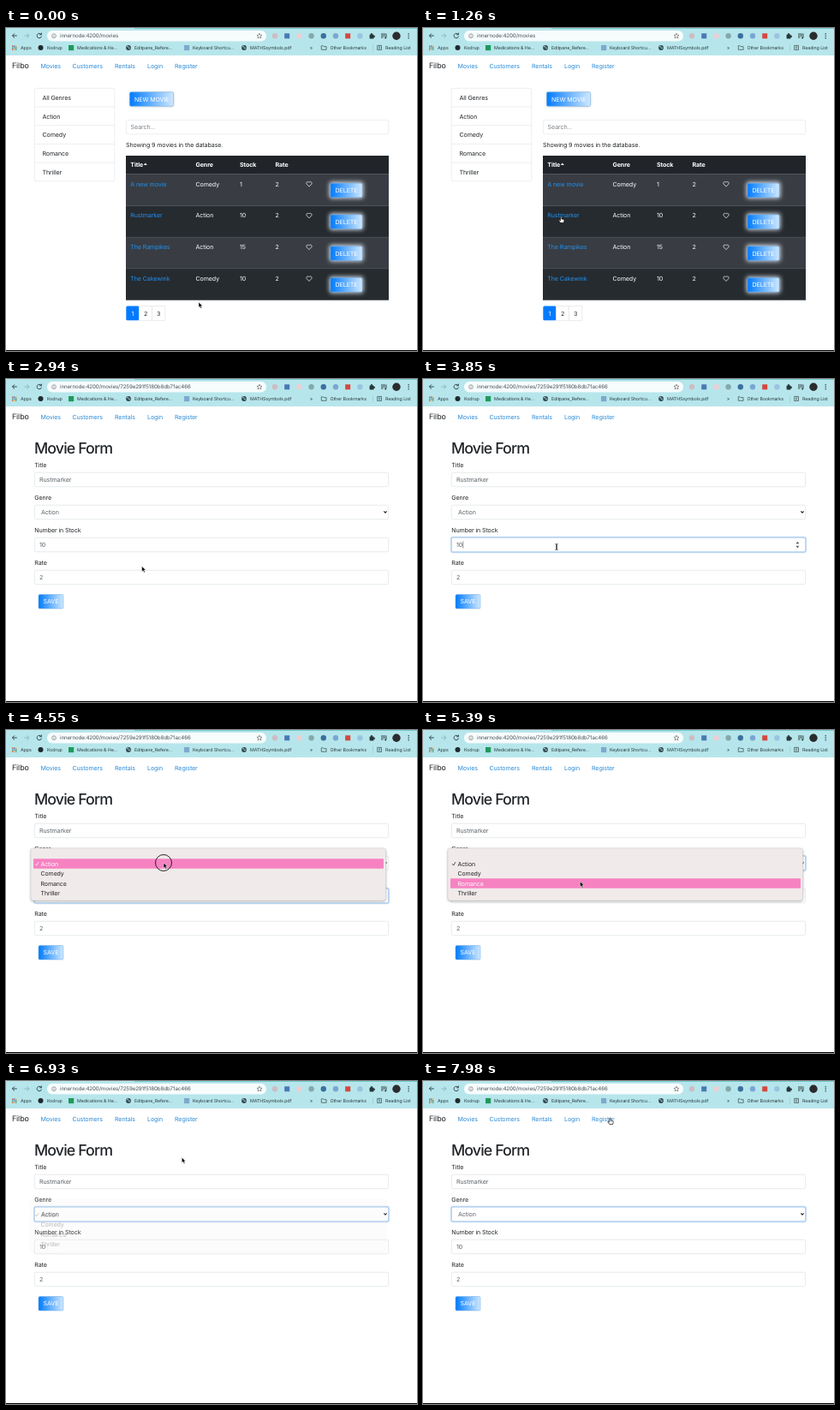
Animation of 480 by 377 pixels, one loop 8000 ms. Source, as an HTML page:

```html
<!DOCTYPE html>
<html lang="en">
<head>
<meta charset="utf-8">
<title>Movie form</title>
<style>
  html, body { margin: 0; width: 100%; height: 100%; overflow: hidden; background: #fff; }
  svg { display: block; width: 100vw; height: 100vh; }
  text {
    font-family: Inter, "Liberation Sans", sans-serif;
    letter-spacing: -.015em; white-space: pre; text-rendering: geometricPrecision;
  }
</style>
</head>
<body>
<svg viewBox="0 0 480 377">
  <defs>
    <linearGradient id="blue"><stop offset="0" stop-color="#007bff"/><stop offset="1" stop-color="#cfe8ff"/></linearGradient>
    <filter id="blur" x="-50%" y="-50%" width="200%" height="200%"><feGaussianBlur stdDeviation="2.6"/></filter>
    <filter id="soft" x="-5%" y="-20%" width="110%" height="140%"><feGaussianBlur stdDeviation="1.8"/></filter>
  </defs>
  <g id="page"></g>
  <g id="browser"></g>
  <g id="pointer"></g>
</svg>
<script>
const LOOP = 8000, STEP = 70;
const PAGE_OPEN = 1820, DATA_READY = 2030, STOCK_FOCUS = 3430, MENU_OPEN = 4480, GENRE_FOCUS = 4620, MENU_FADE = 6930;
const MOVIE = 'Rustmarker';
const GENRES = ['Action', 'Comedy', 'Romance', 'Thriller'];
const ROWS = [['A new movie', 'Comedy', 1], [MOVIE, 'Action', 10], ['The Rampikes', 'Action', 15], ['The Cakewink', 'Comedy', 10]];
const CLICKS = [[1680, 1820], [3430, 3570], [4480, 4690], [6790, 6930]];
// time, x, y of the pointer tip
const PATH = [
  [0, 225, 320], [210, 225, 320], [1330, 160.5, 218.7], [2450, 160.5, 218.7], [2660, 159, 222],
  [2800, 159, 222], [3430, 156, 195], [3850, 156, 196], [4410, 184, 155], [5110, 184, 155],
  [5600, 183, 191], [6020, 182, 174], [6160, 182, 174], [6720, 205.3, 89.2], [7070, 205.3, 89.2],
  [7560, 211, 68], [7980, 218.5, 43]
];

const $ = id => document.getElementById(id);
const text = (x, y, s, fill = '#212529', size = 7.1, extra = '') =>
  `<text x="${x}" y="${y}" fill="${fill}" font-size="${size}" ${extra}>${s}</text>`;
const rect = (x, y, w, h, fill, extra = '') =>
  `<rect x="${x}" y="${y}" width="${w}" height="${h}" fill="${fill}" ${extra}/>`;
const circle = (x, y, r, fill, extra = '') => `<circle cx="${x}" cy="${y}" r="${r}" fill="${fill}" ${extra}/>`;
const line = (d, stroke = '#333', width = .8, extra = '') =>
  `<path d="${d}" fill="none" stroke="${stroke}" stroke-width="${width}" ${extra}/>`;
const button = (x, y, w, label) =>
  rect(x, y, w, 16.5, 'url(#blue)', 'rx="1.5" stroke="#6fa9dc" stroke-width=".5"') + text(x + 5.6, y + 10.8, label, '#fff');

function browser(url) {
  const apps = ['#d9463d', '#5f6368', '#e3a932', '#3b9b5c', '#4285d0', '#5f6368', '#d9463d', '#e3a932', '#3b9b5c'];
  const globe = x => circle(x, 23, 2.9, '#33474c') + line(`M${x - 2} 22q2-1.8 2 .5t2 .6`, '#b6e6eb', .8);
  const label = (x, s) => text(x, 25, s, '#2b3b3f', 5.3);
  return rect(0, 0, 480, 32, '#b6e6eb') + rect(150, 0, 330, .8, '#62c4c8') +
    line('M12.8 9H7.5M10 6.4L7.4 9l2.6 2.6', '#26363a', .9) +
    line('M21.5 9h5.3M24.4 6.4L27 9l-2.6 2.6', '#8bb4b7', .9) +
    line('M40.9 7.3a2.7 2.7 0 1 0 .6 2.3M41.4 5.6v2.2h-2.2', '#26363a', .9) +
    rect(48, 3, 256, 12.5, '#f7fcfd', 'rx="6.2"') +
    circle(56, 9.2, 2.4, 'none', 'stroke="#666" stroke-width=".6"') + line('M56 8.8v1.7M56 7.6v.6', '#666', .6) +
    text(63, 11.4, url, '#4a5054', 6.2) +
    line('M296 6.2l.9 2 2.1.2-1.6 1.4.5 2.1-1.9-1.1-1.9 1.1.5-2.1-1.6-1.4 2.1-.2z', '#555', .6) +
    ['#cdbcc4', '#4a78b5', '#eccfd6', '#83a9ab', '#3b6f9e', '#7aa6d2', '#d4483f', '#9cc3e0'].map((c, i) =>
      i === 1 || i === 6 ? rect(311 + i * 14.2, 6.3, 6, 6, c) : circle(314 + i * 14.2, 9.3, 3.2, c)).join('') +
    rect(424.6, 7.4, 5, 5, '#26363a', 'rx=".7"') + circle(427, 7, 1.1, '#26363a') + circle(430, 9.8, 1.1, '#26363a') +
    line('M438 7h5M438 9h5M438 11h2.6M444 6.5v4.5', '#26363a', .9) + circle(443.2, 11.4, 1, '#26363a') +
    circle(456, 9.3, 4.7, '#2b2b2d') +
    [6.7, 9.2, 11.7].map(y => circle(470.2, y, .75, '#26363a')).join('') +
    apps.map((c, i) => rect(7 + i % 3 * 2, 20.5 + (i / 3 | 0) * 2, 1.4, 1.4, c)).join('') + label(17, 'Apps') +
    circle(40.5, 23, 3, '#1f292d') + label(48, 'Kodrup') +
    rect(73, 20, 6.2, 6.2, '#20995b') + label(83, 'Medications &amp; He...') +
    globe(143) + label(150, 'Editpane_Refere...') +
    rect(208, 20, 6.2, 6.2, '#7fa9cc') + label(218, 'Keyboard Shortcu...') +
    globe(278) + label(285, 'MATHSsymbols.pdf') + label(355, '»') +
    line('M368.3 25.3v-4.5h2l.8.9h3v3.6z', '#46585c', .8) + label(378.5, 'Other Bookmarks') +
    line('M428.5 19v8', '#8cc2c5', .5) +
    line('M433.7 20.4h4.8v5.1h-4.8zM435 22h2.2M435 23.7h2.2', '#46585c', .8) + label(443, 'Reading List') +
    text(7, 47.4, 'Filbo', '#212529', 8.9) +
    [[40.4, 'Movies'], [77.4, 'Customers'], [127, 'Rentals'], [165, 'Login'], [197, 'Register']]
      .map(([x, s]) => text(x, 46.8, s, '#2a8bd8')).join('') +
    rect(0, 376, 480, 1, '#000');
}

function listPage() {
  const border = 'stroke="#dfe2e5" stroke-width=".6"';
  const pitch = 36.8;
  let s = rect(33.3, 70.3, 93.5, 108.5, '#fff', `rx="1.8" ${border}`);
  ['All Genres', ...GENRES].forEach((g, i) => {
    if (i) s += line(`M33.3 ${70.3 + i * 21.7}h93.5`, '#dfe2e5', .6);
    s += text(42.5, 83.8 + i * 21.7, g);
  });
  s += rect(144.5, 75, 51, 16.5, '#789', 'rx="2" opacity=".5" filter="url(#soft)"') + button(144.5, 74.8, 51, 'NEW MOVIE');
  s += rect(140.3, 107.6, 306.4, 16.3, '#fff', `rx="1.8" ${border}`) + text(145.6, 118.3, 'Search...', '#7b8288');
  s += text(140, 138.8, 'Showing 9 movies in the database.');
  s += rect(140, 149, 307, 21.5, '#212529');
  [[145.3, 'Title'], [221.5, 'Genre'], [273, 'Stock'], [314.5, 'Rate']]
    .forEach(([x, h]) => s += text(x, 162.4, h, '#fff', 7.1, 'font-weight="700"'));
  s += '<path d="M160.8 160l2-2.4 2 2.4z" fill="#fff"/>';
  ROWS.forEach(([title, genre, stock], i) => {
    const y = 170.5 + i * pitch, base = y + 14;
    s += rect(140, y, 307, pitch, i % 2 ? '#262b2f' : '#393d43') + line(`M140 ${y}h307`, '#42474c', .5);
    s += text(145.3, base, title, '#2090f0') + text(221.5, base, genre, '#fff') +
      text(273, base, stock, '#fff') + text(314.5, base, 2, '#fff');
    s += line(`M354 ${y + 14.6}l-2.8-2.9c-1.3-1.6 1.1-4 2.8-1.9 1.7-2.1 4.1.3 2.8 1.9z`, '#fff', .7);
    s += rect(377.5, y + 9, 40, 19.5, '#e8f1ff', 'rx="3" opacity=".85" filter="url(#blur)"') + button(379, y + 10.7, 37, 'DELETE');
  });
  [1, 2, 3].forEach((n, i) => {
    s += rect(140.3 + i * 15.2, 324.5, 15.2, 16.8, i ? '#fff' : '#007bff', i ? border : 'rx="1.5"') +
      text(147.8 + i * 15.2, 335.5, n, i ? '#24292e' : '#fff', 7.1, 'text-anchor="middle"');
  });
  return s;
}

function formPage(t, y) {
  const ready = t >= DATA_READY;
  const focus = t < STOCK_FOCUS ? -1 : t < GENRE_FOCUS ? 2 : 1;
  const values = ready ? [MOVIE, 'Action', 10, 2] : ['', '', '', ''];
  let s = text(33, 87.2, 'Movie Form', '#212529', 17.8, 'font-weight="500" style="letter-spacing:-.05em"');
  ['Title', 'Genre', 'Number in Stock', 'Rate'].forEach((name, i) => {
    const top = 109.2 + i * 38, on = i === focus;
    s += text(33.3, top - 6.6, name);
    if (on) s += rect(32.6, top - .7, 414.8, 18, 'none', 'rx="2.4" stroke="#c4dcf3" stroke-width="1.4"');
    s += rect(33.4, top, 413.2, 16.5, '#fff', `rx="1.8" stroke="${on ? '#86b7e6' : '#d9dde0'}" stroke-width=".6"`);
    s += text(i === 1 ? 41 : 39, top + 10.8, values[i], '#5b6269');
    if (i === 1) s += line(`M441.4 ${top + 7.2}l1.6 1.7 1.6-1.7`, '#222', 1.1);
    if (i === 2 && on) {
      s += `<path d="M435.5 ${top + 7}l1.9-2.4 1.9 2.4zM435.5 ${top + 9.6}l1.9 2.4 1.9-2.4z" fill="#555"/>`;
      if ((t - STOCK_FOCUS) % 1000 < 500) s += line(`M46.8 ${top + 4.2}v8.2`, '#222', .5);
    }
  });
  s += `<g opacity="${ready ? 1 : .6}">${button(38, 251.5, 29, 'SAVE')}</g>`;
  if (t >= MENU_OPEN && t < MENU_FADE + STEP) s += menu(y, t >= MENU_FADE);
  return s;
}

function menu(y, fading) {
  const pitch = 11.5, active = Math.floor((y - 150.3) / pitch);
  const panel = rect(29, 139, 414.5, 61, '#555', 'rx="3" opacity=".5" filter="url(#soft)"') +
    rect(29, 138, 414.5, 61, '#f0eaea', 'rx="3" stroke="#d0cbcb" stroke-width=".4"');
  let items = '';
  if (active >= 0 && active < 4) items += rect(32, 150.3 + active * pitch, 409, pitch, '#f782c2', 'rx="1"');
  GENRES.forEach((g, i) => items += text(40.5, 158.5 + i * pitch, g, i === active ? '#fff' : '#262326', 7));
  items += line('M34.3 156.3l1.3 1.7 2.4-3.8', active === 0 ? '#fff' : '#262326', .8);
  return `<g opacity="${fading ? .1 : 1}">${panel}</g><g opacity="${fading ? .3 : 1}">${items}</g>`;
}

function pointerAt(t) {
  const i = Math.max(1, PATH.findIndex(p => p[0] >= t));
  const [t0, x0, y0] = PATH[i - 1], [t1, x1, y1] = PATH[i];
  const u = (t - t0) / (t1 - t0), e = u * u * (3 - 2 * u);
  return [x0 + (x1 - x0) * e, y0 + (y1 - y0) * e];
}

function pointer(t, x, y) {
  const inside = (l, top, r, b) => x > l && x < r && y > top && y < b;
  const listed = t < PAGE_OPEN, menuShown = t >= MENU_OPEN && t < MENU_FADE;
  const onLink = inside(196, 39, 224, 50) || listed && inside(145, 214, 181, 224);
  const onInput = !listed && !menuShown && [109, 185, 223].some(top => inside(33, top, 435, top + 17));
  let shape;
  if (onLink) shape = '<path d="M-.7 .6q.7-1 1.4 0v2.5l2.3.6q.8.3.7 1.2l-.5 2.6H-.7l-2-2.6q.1-1 1-.5l1 .7z" fill="#fff" stroke="#111" stroke-width=".7"/>';
  else if (onInput) shape = line('M-1.5-3.5q1.5 0 1.5 1v5q0 1 1.5 1M1.5-3.5q-1.5 0-1.5 1v5q0 1-1.5 1', '#111', .8);
  else shape = '<path d="M0 0v6.3l1.5-1.4 1 2.4 1.2-.5-1-2.3h2z" fill="#000" stroke="#fff" stroke-width=".5"/>';
  const ring = CLICKS.some(([a, b]) => t >= a && t < b) ? circle(0, 0, 9.5, 'none', 'stroke="#111" stroke-width=".9"') : '';
  return `<g transform="translate(${x} ${y})">${ring}${shape}</g>`;
}

let shownStep = -1, shownUrl = '';
function draw(now) {
  const t = Math.floor(now % LOOP / STEP) * STEP;
  if (t !== shownStep) {
    shownStep = t;
    const [x, y] = pointerAt(t), listed = t < PAGE_OPEN;
    const url = 'innernode:4200/movies' + (listed ? '' : '/7259e291f5180b8db71ac466');
    if (url !== shownUrl) $('browser').innerHTML = browser(shownUrl = url);
    $('page').innerHTML = listed ? listPage() : formPage(t, y);
    $('pointer').innerHTML = pointer(t, x, y);
  }
  requestAnimationFrame(draw);
}
draw(performance.now());
</script>
</body>
</html>
```
